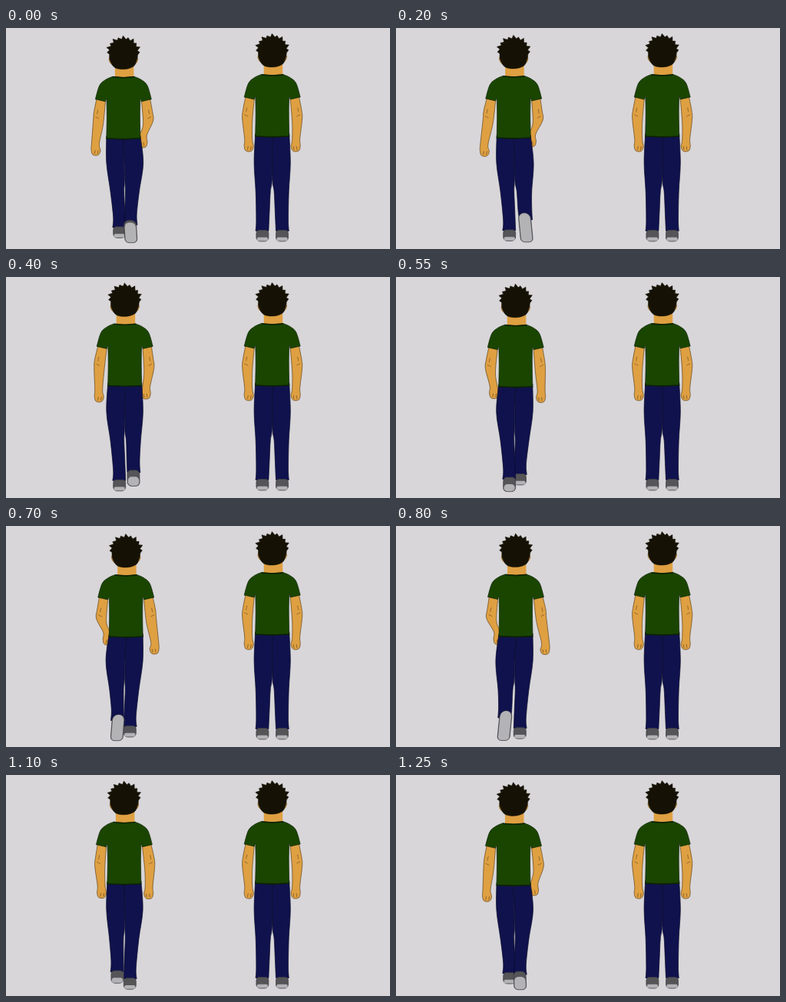
Write an HTML page with a canvas that moves like this. It is 500x288 px and loops after 1300 ms.

```html
<!DOCTYPE html>
<html lang="en">
<head>
<meta charset="utf-8">
<title>Walk cycle</title>
<style>
html, body { margin: 0; width: 100%; height: 100%; overflow: hidden; background: #d8d6d9; }
canvas { display: block; width: 500px; height: 288px; }
</style>
</head>
<body>
<canvas id="stage" width="500" height="288"></canvas>
<script>
const ctx = document.getElementById('stage').getContext('2d');
const LOOP = 1300, STEP = 50, HALF = LOOP / 2;
const BACK = '#d8d6d9', SKIN = '#dfa042', SKIN_EDGE = '#5e431b', SHIRT = '#1a4500', SHIRT_EDGE = '#0c2100';
const PANTS = '#10124e', PANTS_EDGE = '#070824', HAIR = '#151205';

// Cosine that peaks at the given time of the cycle, and its positive half
const wave = (t, peak) => Math.cos(2 * Math.PI * (t - peak) / LOOP);
const pulse = (t, peak, power) => Math.max(0, wave(t, peak)) ** power;

// Right-side limbs, x measured from the body's centre line.
// swing: arm forward (1) or back (-1), out: foot sideways, lift: heel up, floor: foot's lowest y
function pose(swing, out, lift, floor) {
  const shoeX = 6.8 + 8 * out, shoeTop = floor - 14.5 - 24 * lift;
  return {
    handX: 30.5 - 9 * swing, handY: 153.5 - 6.5 * swing, elbow: 39 - 2.4 * swing,
    thigh: 23.6 + lift, kneeOut: 18.5 + 4 * out, kneeIn: .8 + 2.2 * out,
    cuff: shoeTop + 1 + 8 * lift, shoeX, shoeTop, floor, lift
  };
}

const walk = t => pose(
  wave(t, 140),
  pulse(t, 255, 2),
  pulse(t, 160, 1.5),
  278.3 + 1.5 * wave(t, 0) - 6.5 * pulse(t, 490, 2));

const STAND = pose(0, .75, 0, 278);

// Smooth curve through points, continuing the current path
function curve(pts) {
  ctx.lineTo(...pts[0]);
  for (let i = 0; i < pts.length - 1; i++) {
    const a = pts[i], b = pts[i + 1], p = pts[i - 1] || a, q = pts[i + 2] || b;
    ctx.bezierCurveTo(
      a[0] + (b[0] - p[0]) / 6, a[1] + (b[1] - p[1]) / 6,
      b[0] - (q[0] - a[0]) / 6, b[1] - (q[1] - a[1]) / 6, b[0], b[1]);
  }
}

function paint(fill, edge, width = .7) {
  ctx.fillStyle = fill;
  ctx.fill();
  ctx.lineWidth = width;
  ctx.strokeStyle = edge;
  ctx.stroke();
}

function shape(fill, edge, ...runs) {
  ctx.beginPath();
  runs.forEach(curve);
  ctx.closePath();
  paint(fill, edge);
}

function line(color, width, ...pts) {
  ctx.beginPath();
  curve(pts);
  ctx.strokeStyle = color;
  ctx.lineWidth = width;
  ctx.stroke();
}

const mirror = pts => pts.map(([x, y]) => [-x, y]).reverse();

function arm({ handX: x, handY: y, elbow }, dx, dy) {
  const ey = 118 + dy;
  shape(SKIN, SKIN_EDGE,
    [[34 + dx, 86 + dy], [elbow - 1, ey - 12], [elbow, ey], [x + 5.5, y - 9], [x + 6, y], [x + 4, y + 6.5],
      [x - 3, y + 7], [x - 6, y + 1], [x - 4.5, y - 8], [elbow - 13, ey + 4], [23 + dx, 88 + dy]]);
  for (const k of [-3, 1]) line(SKIN_EDGE, .7, [x + k, y + 1], [x + k + .7, y + 5]);
  line(SKIN_EDGE, .6, [elbow - 6, ey - 14], [elbow - 5, ey - 9]);
  line(SKIN_EDGE, .6, [elbow - 7, ey - 3], [elbow - 3, ey - 5]);
}

// Seen from behind: dark upper, pale sole that takes over as the heel rises
function shoe({ shoeX, shoeTop, floor, lift }) {
  const h = floor - shoeTop, pale = h * Math.min(1, .36 + .9 * lift);
  const top = 4 + 3.5 * lift;
  ctx.save();
  ctx.transform(1, 0, .1 * lift, 1, shoeX, floor - h / 2);
  ctx.beginPath();
  ctx.roundRect(-8, -h / 2, 16, h, [top, top, 5, 5]);
  paint('#555558', '#3d3d41');
  ctx.beginPath();
  ctx.roundRect(-7.2, h / 2 - pale, 14.4, pale - .5, [top, top, 4.5, 4.5]);
  ctx.fillStyle = '#b3b3b6';
  ctx.fill();
  ctx.restore();
}

function leg(p, dx, dy) {
  const outer = p.shoeX + 8.8, inner = p.shoeX - 8;
  shape(PANTS, PANTS_EDGE,
    [[22 + dx, 138 + dy], [p.thigh, 176], [p.kneeOut, 213], [outer - .8, p.cuff - 14], [outer, p.cuff]],
    [[inner, p.cuff], [(inner + p.kneeIn) / 2, 238], [p.kneeIn, 213], [.3, 196], [dx, 138 + dy]]);
  shoe(p);
}

function torso() {
  const sleeve = [[14, 60.5], [23, 64.5], [31, 72], [36.5, 90]];
  const flank = [[23.5, 93], [22, 90], [21.5, 112], [22, 141.5]];
  shape(SHIRT, SHIRT_EDGE, sleeve, flank, mirror(flank), mirror(sleeve), [[-14, 60.5], [0, 61.5], [14, 60.5]]);
  line(SHIRT_EDGE, 1.4, [-13.5, 61], [0, 62], [13.5, 61]);
  line(SHIRT_EDGE, 1.4, [-22, 141], [0, 142], [22, 141]);
}

function head() {
  ctx.beginPath();
  ctx.ellipse(0, 38, 18.8, 11.5, 0, 0, Math.PI * 2);
  paint(SKIN, SKIN_EDGE, .5);
  ctx.fillStyle = SKIN;
  ctx.fillRect(-11, 44, 24.5, 18);

  const spikes = 11, span = Math.PI * 1.1, start = Math.PI * .96;
  const rim = (i, r) => {
    const a = start + span * i / spikes;
    return [19 * r * Math.cos(a), 29 + 18 * r * Math.sin(a)];
  };
  ctx.beginPath();
  for (let i = 0; i < spikes; i++) {
    ctx.lineTo(...rim(i, .97));
    ctx.lineTo(...rim(i + .35, 1.12 + .09 * (i % 2)));
  }
  curve([rim(spikes, 1), [17.5, 39], [13, 47.5], [1, 51], [-11, 49], [-17.3, 40], rim(0, .97)]);
  ctx.closePath();
  paint(HAIR, HAIR, .4);
}

function figure(cx, right, left, sway, dip, rightNear) {
  const limb = (draw, side) => {
    ctx.save();
    ctx.scale(side, 1);
    draw(side > 0 ? right : left, sway * side, dip);
    ctx.restore();
  };
  const near = rightNear ? 1 : -1;
  ctx.save();
  ctx.translate(cx, 0);
  limb(arm, 1);
  limb(arm, -1);
  limb(leg, -near);
  limb(leg, near);
  ctx.translate(sway, dip);
  head();
  torso();
  ctx.restore();
}

function frame() {
  const t = Math.floor(performance.now() % LOOP / STEP) * STEP;
  const sway = -1.7 * wave(t, 50), dip = 1.7 + 1.3 * wave(2 * t, 120);
  ctx.fillStyle = BACK;
  ctx.fillRect(0, 0, 500, 288);
  figure(154.5, walk(t), walk(t + HALF), sway, dip, (t + 150) % LOOP < HALF);
  figure(346.7, STAND, STAND, 0, 0, true);
  requestAnimationFrame(frame);
}

ctx.lineJoin = 'round';
ctx.lineCap = 'round';
frame();
</script>
</body>
</html>
```
